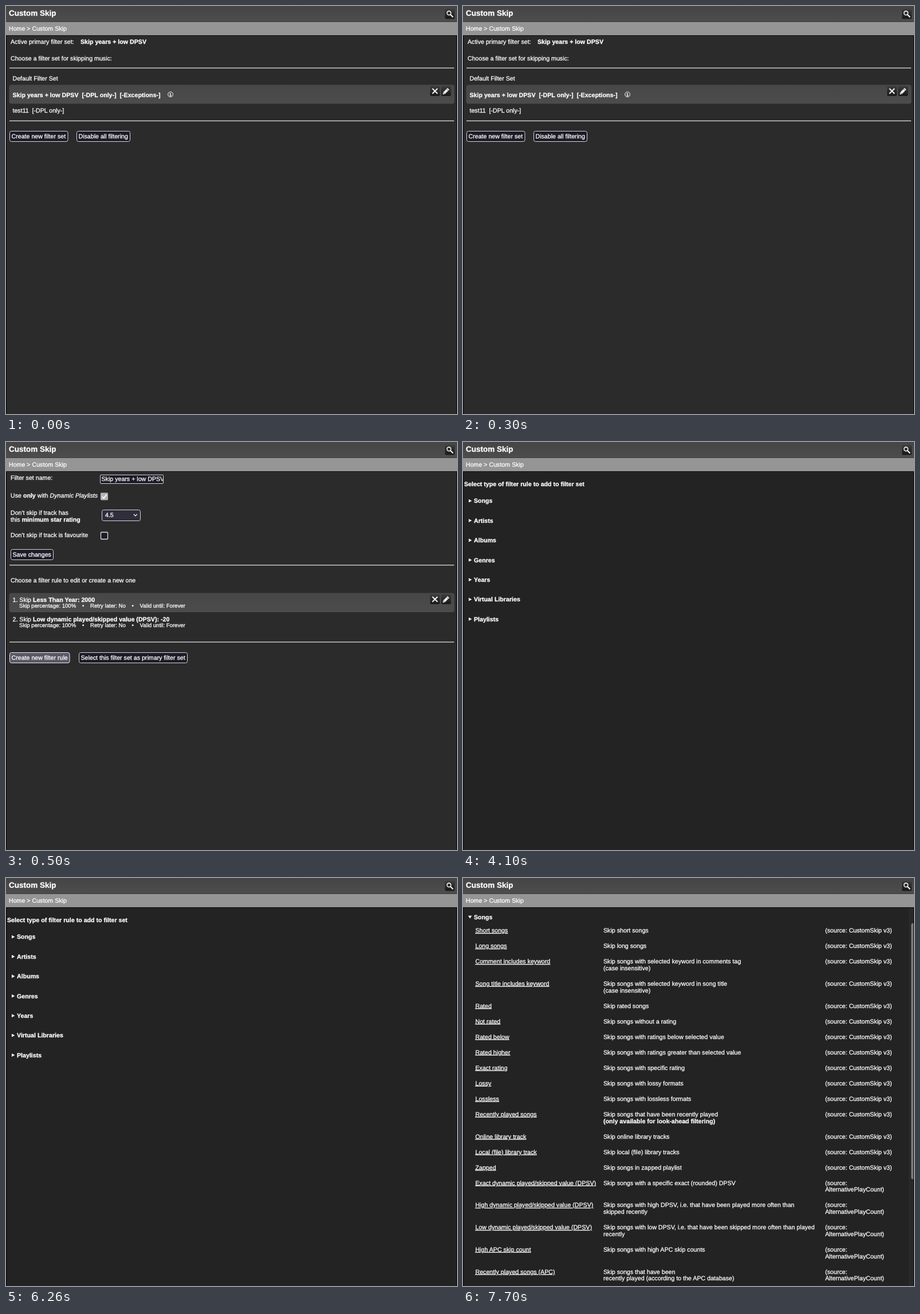
Animation, 787 px wide and 712 px high, one loop 8000 ms. Source, as an HTML page:

```html
<!DOCTYPE html>
<html lang="en">
<head>
<meta charset="utf-8">
<title>Custom Skip</title>
<style>
  html, body { margin: 0; width: 100%; height: 100%; overflow: hidden; background: #2b2b2b; }
  svg { display: block; }
  text {
    font: 10.65px "Liberation Sans", Arial, sans-serif;
    fill: #fff; stroke: #fff; stroke-width: .28px;
    white-space: pre; text-rendering: geometricPrecision;
  }
  .bold { font-weight: bold; }
  .italic { font-style: italic; }
  .small { font-size: 9.6px; }
  .link { text-decoration: underline; }
  .title { font-size: 13.5px; font-weight: bold; }
  .rule { fill: #dcdcdc; }
  .row { fill: url(#rowFill); }
  .box { fill: #1d1b25; stroke: #d6d3e2; }
  .box.menu { fill: #302e3b; }
  .box.hover { fill: #5a5766; stroke: #f0eef6; }

  .scene { visibility: hidden; animation: 8s step-end infinite; }
  #sets { animation-name: sets; }
  #edit { animation-name: edit; }
  #types { animation-name: types; }
  #songs { animation-name: songs; }
  @keyframes sets { 0% { visibility: visible } 6.25%, 100% { visibility: hidden } }
  @keyframes edit { 0% { visibility: hidden } 6.25% { visibility: visible } 51.25%, 100% { visibility: hidden } }
  @keyframes types { 0% { visibility: hidden } 51.25% { visibility: visible } 96.25%, 100% { visibility: hidden } }
  @keyframes songs { 0% { visibility: hidden } 96.25%, 100% { visibility: visible } }
</style>
</head>
<body>
<svg width="787" height="712" viewBox="0 0 787 712">
  <defs>
    <linearGradient id="headFill" x2="0" y2="1">
      <stop stop-color="#454545"/><stop offset="1" stop-color="#4d4d4d"/>
    </linearGradient>
    <linearGradient id="rowFill" x2="0" y2="1">
      <stop stop-color="#474747"/><stop offset="1" stop-color="#4c4c4c"/>
    </linearGradient>
    <linearGradient id="iconFill" x2="0" y2="1">
      <stop stop-color="#3c3c3c"/><stop offset="1" stop-color="#181818"/>
    </linearGradient>
    <clipPath id="inputClip"><rect x="165" y="58" width="108.5" height="14"/></clipPath>
    <g id="tools">
      <rect width="17" height="17" rx="2.5" fill="url(#iconFill)"/>
      <path d="M4 4l9 9m0-9l-9 9" stroke="#f0f0f0" stroke-width="2"/>
      <rect x="19.5" width="17" height="17" rx="2.5" fill="url(#iconFill)"/>
      <path d="M22 14.5l1-4 7.5-7.5 3 3-7.5 7.5z" fill="#ececec"/>
      <path d="M28.6 4.8l3 3M23 10.8l2.8 2.8" stroke="#444" stroke-width=".8"/>
    </g>
    <text id="details" class="small"><tspan x="23">Skip percentage: 100%</tspan><tspan x="133">•</tspan><tspan x="147">Retry later: No</tspan><tspan x="219.5">•</tspan><tspan x="233.5">Valid until: Forever</tspan></text>
  </defs>

  <rect width="787" height="712" fill="#2b2b2b"/>

  <g id="sets" class="scene">
    <text x="8" y="66">Active primary filter set:</text>
    <text x="130" y="66" class="bold">Skip years + low DPSV</text>
    <text x="8" y="95">Choose a filter set for skipping music:</text>
    <rect class="rule" x="6" y="107.6" width="776" height="1.3"/>
    <text x="11.5" y="130">Default Filter Set</text>
    <rect class="row" x="5.5" y="137.5" width="777" height="33" rx="4"/>
    <text y="158.7" class="bold"><tspan x="11.5">Skip years + low DPSV</tspan><tspan x="132.5">[-DPL only-]</tspan><tspan x="198.5">[-Exceptions-]</tspan></text>
    <circle cx="287" cy="154.3" r="4.4" fill="none" stroke="#fff"/>
    <text x="287" y="156.8" text-anchor="middle" class="bold" style="font-size:7px">1</text>
    <use href="#tools" x="740" y="140"/>
    <text y="186"><tspan x="11.5">test11</tspan><tspan x="45.5">[-DPL only-]</tspan></text>
    <rect class="rule" x="6" y="199.8" width="776" height="1.3"/>
    <rect class="box" x="6.5" y="218.5" width="101.5" height="18" rx="3"/>
    <text x="9.5" y="230.5">Create new filter set</text>
    <rect class="box" x="123.5" y="218.5" width="93" height="18" rx="3"/>
    <text x="126.5" y="230.5">Disable all filtering</text>
  </g>

  <g id="edit" class="scene">
    <text x="8" y="66">Filter set name:</text>
    <rect class="box" x="164.5" y="57.5" width="110" height="15" rx="1.5"/>
    <g clip-path="url(#inputClip)"><text x="166.5" y="68">Skip years + low DPSV</text></g>
    <text x="8" y="97">Use <tspan class="bold">only</tspan> with <tspan class="italic">Dynamic Playlists</tspan></text>
    <rect x="165" y="88.5" width="13" height="13" rx="1.5" fill="#b4b4b4"/>
    <path d="M167.8 95.3l2.8 3 4.8-6.6" fill="none" stroke="#fff" stroke-width="1.8"/>
    <text x="8" y="127">Don't skip if track has</text>
    <text x="8" y="138.5">this <tspan class="bold">minimum star rating</tspan></text>
    <rect class="box menu" x="167.5" y="118.5" width="67" height="19" rx="3"/>
    <text x="173" y="130.5">4.5</text>
    <path d="M222.8 126l3 3 3-3" fill="none" stroke="#f0f0f0" stroke-width="1.3"/>
    <text x="8" y="165.8">Don't skip if track is favourite</text>
    <rect x="165.5" y="157.5" width="12" height="12" rx="1" fill="#1d1b25" stroke="#e0dee8" stroke-width="1.3"/>
    <rect class="box" x="8.5" y="187.5" width="74" height="18" rx="3"/>
    <text x="11.5" y="199.7">Save changes</text>
    <rect class="rule" x="6" y="214.2" width="776" height="1.3"/>
    <text x="8" y="244.8">Choose a filter rule to edit or create a new one</text>
    <rect class="row" x="5.5" y="263.5" width="777" height="33.5" rx="4"/>
    <text x="11.5" y="278.5">1. Skip <tspan class="bold">Less Than Year: 2000</tspan></text>
    <use href="#details" y="289.3"/>
    <use href="#tools" x="740" y="266"/>
    <text x="11.5" y="312.7">2. Skip <tspan class="bold">Low dynamic played/skipped value (DPSV): -20</tspan></text>
    <use href="#details" y="323.4"/>
    <rect class="rule" x="6" y="348.5" width="776" height="1.3"/>
    <rect class="box hover" x="6.5" y="367.5" width="104.5" height="18" rx="3"/>
    <text x="9.5" y="379.7">Create new filter rule</text>
    <rect class="box" x="127.5" y="367.5" width="189" height="18" rx="3"/>
    <text x="130.5" y="379.7">Select this filter set as primary filter set</text>
  </g>

  <g id="types" class="scene">
    <rect y="52" width="787" height="660" fill="#232323"/>
    <text x="2" y="77.3" class="bold">Select type of filter rule to add to filter set</text>
  </g>

  <g id="songs" class="scene">
    <rect y="52" width="787" height="660" fill="#232323"/>
    <path d="M9 65.8h6.4l-3.2 5z" fill="#fff"/>
    <text x="19" y="71.7" class="bold">Songs</text>
    <rect x="778" y="53" width="9" height="659" fill="#292929"/>
    <rect x="782" y="79" width="8" height="446.5" rx="3" fill="#787878"/>
  </g>

  <rect y="52" width="1.2" height="660" fill="#080808"/>
  <rect x="786" y="52" width="1" height="660" fill="#080808"/>
  <rect width="787" height="28" fill="url(#headFill)"/>
  <rect y="27" width="787" height="1" fill="#3c3c3c"/>
  <rect y="28" width="787" height="23" fill="#959595"/>
  <rect y="51" width="787" height="1" fill="#101010"/>
  <text x="5" y="16.5" class="title">Custom Skip</text>
  <text x="5" y="42.7">Home &gt; Custom Skip</text>
  <rect x="766" y="5.5" width="17" height="17" rx="2.5" fill="url(#iconFill)"/>
  <circle cx="773" cy="12.3" r="3.4" fill="none" stroke="#f0f0f0" stroke-width="1.6"/>
  <path d="M775.8 15.2l3.8 3.8" stroke="#f0f0f0" stroke-width="2.2" stroke-linecap="round"/>
</svg>
<script>
  const types = document.getElementById("types");
  const songs = document.getElementById("songs");

  function add(parent, tag, attrs, content = "") {
    const node = document.createElementNS("http://www.w3.org/2000/svg", tag);
    for (const key in attrs) node.setAttribute(key, attrs[key]);
    node.textContent = content;
    parent.append(node);
  }

  ["Songs", "Artists", "Albums", "Genres", "Years", "Virtual Libraries", "Playlists"]
    .forEach((name, i) => {
      const y = 106.4 + i * 34.4;
      add(types, "path", { d: `M10 ${y - 6.6}l5.4 2.9-5.4 2.9z`, fill: "#fff" });
      add(types, "text", { x: 19, y, class: "bold" }, name);
    });

  // Name | description | second description line; "*" marks a bold second line, "+" the other plugin.
  const rules = `Short songs|Skip short songs
Long songs|Skip long songs
Comment includes keyword|Skip songs with selected keyword in comments tag|(case insensitive)
Song title includes keyword|Skip songs with selected keyword in song title|(case insensitive)
Rated|Skip rated songs
Not rated|Skip songs without a rating
Rated below|Skip songs with ratings below selected value
Rated higher|Skip songs with ratings greater than selected value
Exact rating|Skip songs with specific rating
Lossy|Skip songs with lossy formats
Lossless|Skip songs with lossless formats
Recently played songs|Skip songs that have been recently played|*(only available for look-ahead filtering)
Online library track|Skip online library tracks
Local (file) library track|Skip local (file) library tracks
Zapped|Skip songs in zapped playlist
+Exact dynamic played/skipped value (DPSV)|Skip songs with a specific exact (rounded) DPSV
+High dynamic played/skipped value (DPSV)|Skip songs with high DPSV, i.e. that have been played more often than|skipped recently
+Low dynamic played/skipped value (DPSV)|Skip songs with low DPSV, i.e. that have been skipped more often than played|recently
+High APC skip count|Skip songs with high APC skip counts
+Recently played songs (APC)|Skip songs that have been|recently played (according to the APC database)`;

  let y = 95;
  for (const rule of rules.split("\n")) {
    const [name, text, more = ""] = rule.split("|");
    const alternative = name[0] === "+";
    add(songs, "text", { x: 21.5, y, class: "link" }, name.replace("+", ""));
    add(songs, "text", { x: 245, y }, text);
    if (more) {
      add(songs, "text", { x: 245, y: y + 11.7, class: more[0] === "*" ? "bold" : "" }, more.replace("*", ""));
    }
    add(songs, "text", { x: 632, y }, alternative ? "(source:" : "(source: CustomSkip v3)");
    if (alternative) add(songs, "text", { x: 632, y: y + 11.7 }, "AlternativePlayCount)");
    y += more || alternative ? 38.7 : 27.05;
  }
</script>
</body>
</html>
```
